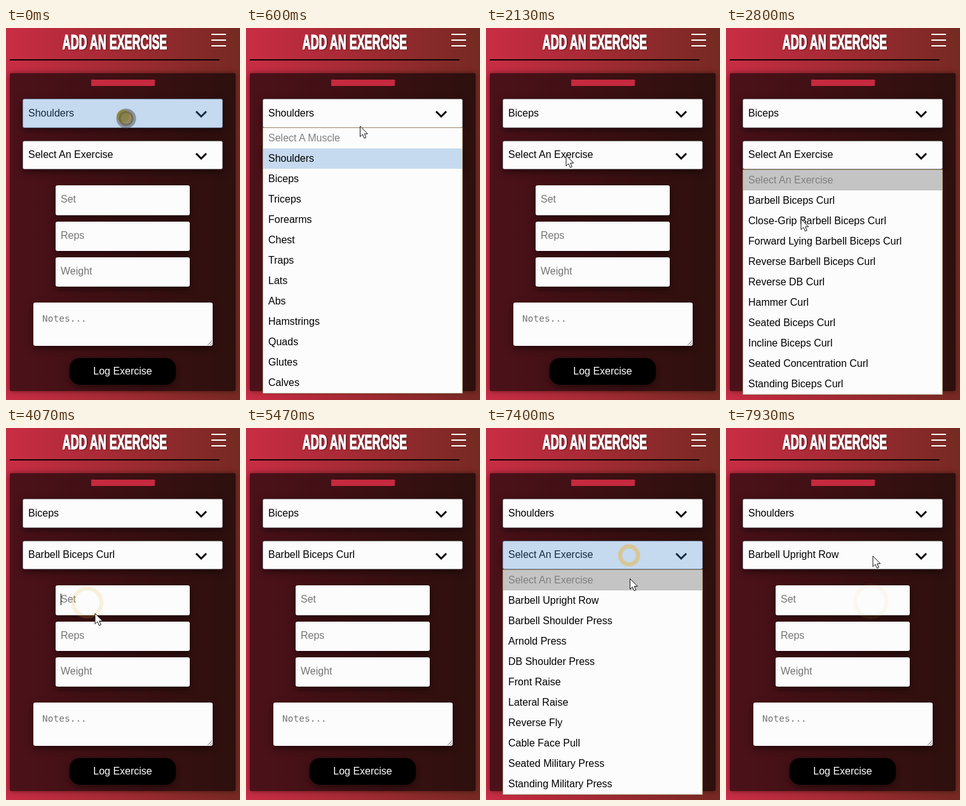
Animation of 368x584 px, one loop 8 s. Source, as an HTML page:

```html
<!DOCTYPE html>
<html lang="en">
<head>
<meta charset="utf-8">
<title>Add an exercise</title>
<style>
  html, body { margin: 0; width: 100%; height: 100%; overflow: hidden; }
  body { font: 16px "Liberation Sans", Arial, sans-serif; color: #000; }
  #stage { position: relative; width: 368px; height: 584px; overflow: hidden;
    background: linear-gradient(90deg, #c82e44, #c42c41 8%, #762922); }
  #stage div, svg { position: absolute; box-sizing: border-box; }
  #title { left: 0; top: 4px; width: 342px; text-align: center; font-weight: bold; font-size: 32px;
    line-height: 37px; color: #fff; white-space: nowrap; transform: scaleX(.56);
    -webkit-text-stroke: 1.4px #fff; text-shadow: 2px 1px 3px rgba(0,0,0,.7); }
  #menu { left: 323px; top: 9px; width: 23px; height: 21px;
    background: repeating-linear-gradient(#fff 0 2.5px, transparent 2.5px 9px); }
  #rule { left: 6px; top: 49px; width: 330px; height: 2px; background: #0c0303; }
  #panel { left: 6px; top: 71px; width: 355px; height: 499px; border-radius: 2px;
    background: rgba(0,0,0,.62); box-shadow: 0 0 9px rgba(0,0,0,.45); }
  #bar { left: 134px; top: 81px; width: 100px; height: 10px; background: #c5293e; }
  .field { background: #fcfcfc; border-radius: 3px; color: #757575; padding-left: 8px;
    box-shadow: 0 4px 12px rgba(0,0,0,.5); white-space: nowrap; }
  .select { left: 26px; width: 315px; color: #000; border: 1px solid #7d7d7d; }
  .select svg { left: 270px; top: 17px; fill: none; stroke: #000; stroke-width: 3; }
  .tap { inset: -1px; border-radius: 3px; background: rgba(70,137,207,.3); }
  .set { left: 78px; width: 211px; height: 46px; line-height: 43px; }
  #caret { left: 86px; top: 260px; width: 1px; height: 18px; background: #000; }
  #notes { left: 43px; top: 431px; width: 282px; height: 68px; padding-left: 14px; line-height: 50px;
    font-family: "DejaVu Sans Mono", monospace; font-size: 14.5px; }
  #notes svg { right: 1px; bottom: 1px; stroke: #777; }
  #log { left: 100px; top: 518px; width: 167px; height: 42px; border-radius: 16px; background: #000;
    color: #fff; text-align: center; line-height: 41px; box-shadow: 0 3px 10px rgba(0,0,0,.45); }
  .list { left: 26px; width: 315px; background: #fcfcfc; border: 1px solid #9b8668; }
  #stage .list p { margin: 0; padding-left: 8px; height: 32px; line-height: 32px; white-space: nowrap; }
  .list p:first-child { color: #808080; }
  .list p.on { background: #c6daef; }
  .list p.off { background: #c4c4c4; }
  #overlay { inset: 0; }
</style>
</head>
<body>
<div id="stage">
  <div id="title">ADD AN EXERCISE</div>
  <div id="menu"></div>
  <div id="rule"></div>
  <div id="panel"></div>
  <div id="bar"></div>
  <div class="field select" style="top:111px;height:46px;line-height:43px">
    <span id="muscle"></span>
    <svg width="20" height="14"><path d="M2 2l8 8 8-8"/></svg>
    <div class="tap" id="muscleTap"></div>
  </div>
  <div class="field select" style="top:177px;height:45px;line-height:41px">
    <span id="exercise"></span>
    <svg width="20" height="14"><path d="M2 2l8 8 8-8"/></svg>
    <div class="tap" id="exerciseTap"></div>
  </div>
  <div class="field set" style="top:247px;height:47px">Set</div>
  <div class="field set" style="top:304px">Reps</div>
  <div class="field set" style="top:360px">Weight</div>
  <div id="caret"></div>
  <div class="field" id="notes">Notes...<svg width="7" height="7"><path d="M0 7L7 0M4 7L7 4"/></svg></div>
  <div id="log">Log Exercise</div>
  <div class="list" id="muscleList" style="top:156px"></div>
  <div class="list" id="bicepsList" style="top:222px"></div>
  <div class="list" id="shouldersList" style="top:222px"></div>
  <svg id="overlay" width="368" height="584">
    <circle id="ring" fill="none" stroke="#e9b94a"/>
    <g id="touch">
      <circle cx="184" cy="138" r="10" fill="#c9b21c" opacity=".75"/>
      <circle cx="189" cy="142" r="15.5" fill="#4a5058" opacity=".5"/>
      <circle cx="189" cy="142" r="10" fill="none" stroke="#3c434c" stroke-width="3" opacity=".35"/>
    </g>
    <path id="arrow" d="M0 0V16.5L3.8 13L6.5 19L9.3 17.8L6.7 12H11.8Z" fill="#fff" stroke="#111"/>
  </svg>
</div>
<script>
const LOOP = 8000;
const el = id => document.getElementById(id);

const lists = {
  muscleList: ["Select A Muscle", "Shoulders", "Biceps", "Triceps", "Forearms", "Chest", "Traps", "Lats",
    "Abs", "Hamstrings", "Quads", "Glutes", "Calves"],
  bicepsList: ["Select An Exercise", "Barbell Biceps Curl", "Close-Grip Barbell Biceps Curl",
    "Forward Lying Barbell Biceps Curl", "Reverse Barbell Biceps Curl", "Reverse DB Curl", "Hammer Curl",
    "Seated Biceps Curl", "Incline Biceps Curl", "Seated Concentration Curl", "Standing Biceps Curl"],
  shouldersList: ["Select An Exercise", "Barbell Upright Row", "Barbell Shoulder Press", "Arnold Press",
    "DB Shoulder Press", "Front Raise", "Lateral Raise", "Reverse Fly", "Cable Face Pull",
    "Seated Military Press", "Standing Military Press"]
};
for (const [id, items] of Object.entries(lists))
  el(id).innerHTML = items.map(text => `<p>${text}</p>`).join("");
el("bicepsList").firstChild.className = el("shouldersList").firstChild.className = "off";

// Time spans in which each part is visible
const spans = {
  touch: [[0, 190]],
  muscleTap: [[0, 380], [6540, 6860]],
  exerciseTap: [[2170, 2450], [7265, 7450]],
  muscleList: [[150, 1300], [6610, 7020]],
  bicepsList: [[2240, 3410]],
  shouldersList: [[7330, 7560]],
  caret: [[3750, 4250], [4750, 5250]],
  arrow: [[190, 5440], [5640, LOOP]]
};
const values = {
  muscle: [[0, "Shoulders"], [1300, "Biceps"], [7020, "Shoulders"]],
  exercise: [[0, "Select An Exercise"], [3410, "Barbell Biceps Curl"], [7020, "Select An Exercise"],
    [7560, "Barbell Upright Row"]]
};
const clicks = [-30, 1300, 2160, 3400, 3750, 6530, 7010, 7255, 7550];
const path = [
  [0, 188, 141], [450, 188, 141], [1100, 126, 237], [1480, 126, 237], [2050, 126, 200], [2350, 126, 200],
  [2780, 118, 300], [2980, 118, 300], [3280, 128, 274], [3820, 128, 274], [4060, 140, 291],
  [5180, 140, 291], [5440, 375, 475], [5640, 318, 400], [6440, 239, 157], [6750, 239, 157],
  [6980, 200, 206], [7040, 200, 206], [7220, 225, 200], [7300, 225, 200], [7500, 228, 272],
  [7600, 228, 272], [7880, 231, 201], [LOOP, 231, 201]
];

function cursorAt(t) {
  const i = Math.max(1, path.findIndex(p => p[0] >= t));
  const [t0, x0, y0] = path[i - 1], [t1, x1, y1] = path[i];
  const p = Math.max(0, (t - t0) / (t1 - t0)), e = p * p * (3 - 2 * p);
  return [x0 + (x1 - x0) * e, y0 + (y1 - y0) * e];
}

function drawRing(t) {
  const start = clicks.filter(c => c <= t).pop(), age = t - start;
  const outer = 11 + age * 0.044, width = Math.max(6, 11 - age * 0.03);
  const [x, y] = cursorAt(Math.max(0, start));
  const attrs = { cx: x, cy: y, r: outer - width / 2, "stroke-width": width,
    opacity: Math.max(0, 0.8 * (1 - age / 420)) };
  for (const name in attrs) el("ring").setAttribute(name, attrs[name]);
}

function render(t) {
  for (const id in spans)
    el(id).style.display = spans[id].some(([from, to]) => t >= from && t < to) ? "" : "none";
  for (const id in values)
    el(id).textContent = values[id].filter(v => v[0] <= t).pop()[1];
  for (const row of el("muscleList").children)
    row.className = row.textContent === el("muscle").textContent ? "on" : "";
  el("arrow").setAttribute("transform", `translate(${cursorAt(t)})`);
  drawRing(t);
}

const begin = performance.now();
function tick() {
  render((performance.now() - begin) % LOOP);
  requestAnimationFrame(tick);
}
tick();
</script>
</body>
</html>
```
